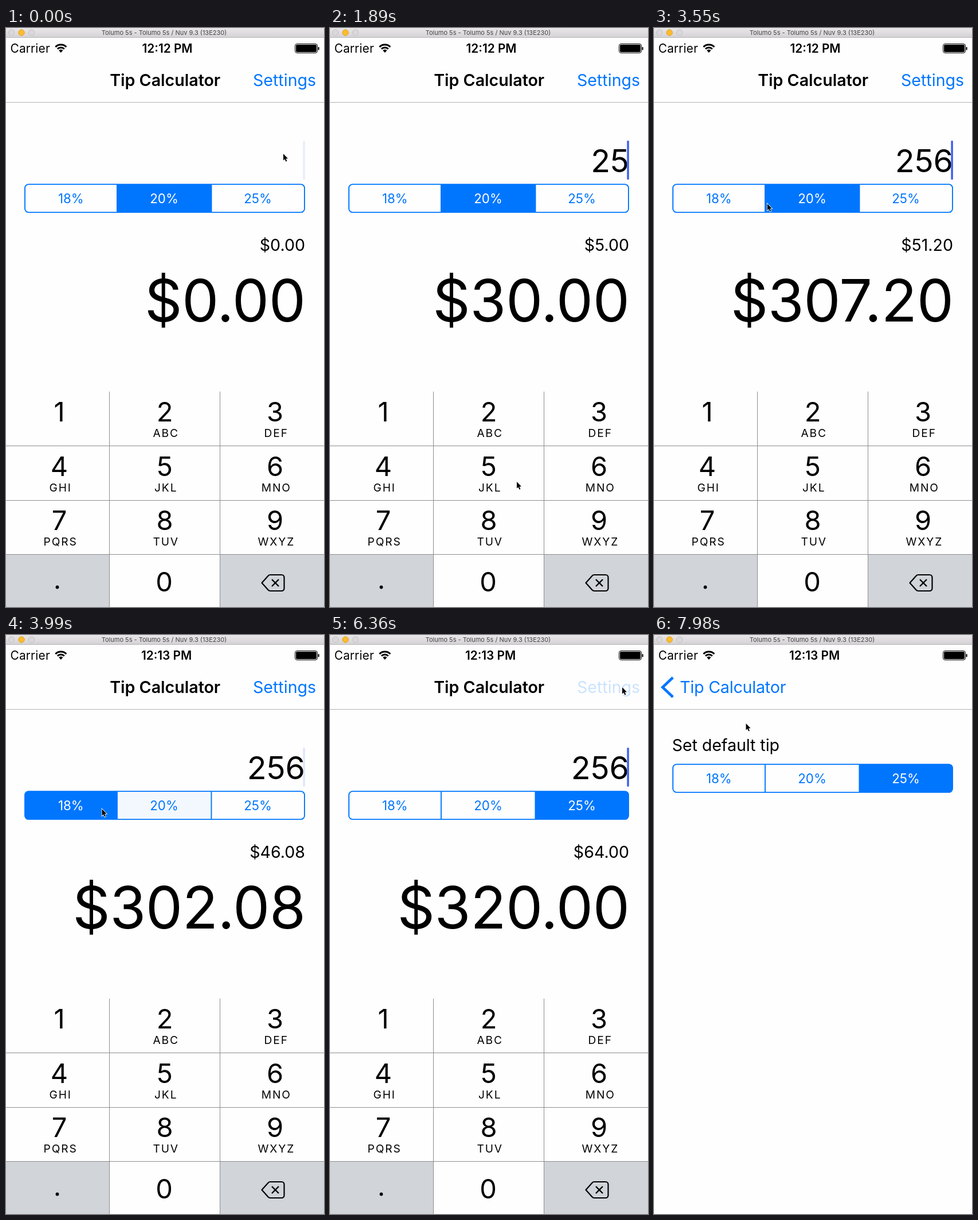
An HTML page with a canvas that plays this animation: 555x1008 px, repeating every 8000 ms.

```html
<!DOCTYPE html>
<html lang="en">
<head>
<meta charset="utf-8">
<title>Tip Calculator</title>
<style>
  html, body { margin: 0; width: 100%; height: 100%; overflow: hidden; background: #fefefe; }
  canvas { display: block; width: 555px; height: 1008px; }
</style>
</head>
<body>
<canvas id="stage" width="555" height="1008"></canvas>
<script>
const W = 555, H = 1008, LOOP = 8000;
const BLUE = '#0076ff', PAPER = '#fefefe', GREY = '#d1d4d9', LINE = '#8e8e90';
const SANS = 'Inter, "Open Sans", sans-serif';
const ctx = document.getElementById('stage').getContext('2d');

// what the user does
const TYPED = '256', TYPE_TIMES = [1270, 1710, 2240];
const RATES = [18, 20, 25];
const TIP = [[0, 1], [3900, 0], [5580, 2]];
const DEFAULT_TIP = [[0, 1], [7540, 2]];
const PUSH_START = 6660, PUSH_END = 7040;

// pointer moves: start, end, x, y
const MOVES = [
  [60, 530, 345, 802],
  [530, 830, 324, 697],
  [1200, 1420, 326, 790],
  [1890, 2410, 420, 803],
  [2500, 2680, 335.5, 807.5],
  [2680, 3370, 240, 310],
  [3440, 3640, 167.5, 303],
  [4180, 5050, 340, 299],
  [5240, 5370, 432, 293],
  [5640, 6270, 510, 91],
  [6680, 7190, 407, 266],
  [7500, 7660, 392, 350],
  [7660, 7980, 160.5, 154]
];

const clamp = v => Math.max(0, Math.min(1, v));
const ramp = (t, from, to) => clamp((t - from) / (to - from));
const smooth = k => k * k * (3 - 2 * k);
const money = v => '$' + v.toFixed(2);

function text(str, x, y, size, { align = 'left', weight = 400, color = '#000', gap = 0 } = {}) {
  ctx.font = `${weight} ${size}px ${SANS}`;
  ctx.letterSpacing = gap + 'px';
  ctx.textAlign = align;
  ctx.fillStyle = color;
  ctx.fillText(str, x, y);
}

function rect(x, y, w, h, color) {
  ctx.fillStyle = color;
  ctx.fillRect(x, y, w, h);
}

function stroke(width, color) {
  ctx.lineWidth = width;
  ctx.strokeStyle = color;
  ctx.stroke();
}

function fill(color) {
  ctx.fillStyle = color;
  ctx.fill();
}

function disc(x, y, r, color) {
  ctx.beginPath();
  ctx.arc(x, y, r, 0, 7);
  fill(color);
}

function box(x, y, w, h, r) {
  ctx.beginPath();
  ctx.roundRect(x, y, w, h, r);
}

function poly(points, closed) {
  ctx.beginPath();
  points.forEach(([x, y]) => ctx.lineTo(x, y));
  if (closed) ctx.closePath();
}

function layer(dx, alpha, draw) {
  if (alpha <= 0) return;
  ctx.save();
  ctx.translate(dx, 0);
  ctx.globalAlpha *= alpha;
  draw();
  ctx.restore();
}

function titleBar() {
  const g = ctx.createLinearGradient(0, 0, 0, 17);
  g.addColorStop(0, '#e9e7e9');
  g.addColorStop(1, '#d3d1d3');
  rect(0, 0, W, 17, g);
  rect(0, 16, W, 1, '#b6b4b6');
  ['#dad8da', '#fdbc2f', '#dad8da'].forEach((color, i) => {
    disc(9.5 + 17.5 * i, 8, 5.2, color);
    stroke(1, i === 1 ? '#dfa023' : '#c3c1c3');
  });
  text('Tolumo 5s - Tolumo 5s / Nuv 9.3 (13E230)', 276, 12, 11, { align: 'center', color: '#454545' });
}

function statusBar(t) {
  text('Carrier', 7.5, 43, 20.8, { gap: 0.2 });
  const late = t >= TIP[1][0];
  text(late ? '12:13 PM' : '12:12 PM', late ? 280 : 281.5, 43, 20.8, { align: 'center', weight: 600 });

  const from = -Math.PI * 0.75, to = -Math.PI * 0.25;
  for (const r of [8.4, 13.4]) {
    ctx.beginPath();
    ctx.arc(95.8, 42.5, r, from, to);
    stroke(3, '#000');
  }
  ctx.beginPath();
  ctx.moveTo(95.8, 43);
  ctx.arc(95.8, 42.5, 5, from, to);
  fill('#000');

  box(504.5, 27.5, 39, 16, 3.5);
  stroke(1, '#000');
  box(506, 29, 36, 13, 2);
  fill('#000');
  box(544.6, 33, 2, 5.5, 1);
  fill('#000');
}

function navBar(t, p) {
  const pressed = ramp(t, 6230, 6300) * (1 - ramp(t, 6640, 6700));
  layer(-150 * p, 1 - p, () =>
    text('Tip Calculator', 277.7, 101, 28.6, { align: 'center', weight: 600 }));
  layer(0, (1 - p) * (1 - 0.8 * pressed), () =>
    text('Settings', 431, 101, 28.6, { color: BLUE }));
  layer(0, p, () => {
    poly([[33, 74], [15, 91], [33, 108]]);
    stroke(4.6, BLUE);
  });
  layer(140 * (1 - p), p, () => text('Tip Calculator', 45, 101, 28.6, { color: BLUE, gap: -0.2 }));
  rect(0, 129, W, 1, '#b4b4b6');
}

function selected(states, t) {
  return states.filter(([time]) => time <= t).pop()[1];
}

function segments(y, states, t) {
  const edges = [33, 194, 358.5, 521];
  const active = selected(states, t);
  const [since] = states.find(([, i]) => i === active);
  const previous = since > 0 ? selected(states, since - 1) : -1;

  RATES.forEach((rate, i) => {
    const left = edges[i], width = edges[i + 1] - left;
    const alpha = i === active ? 1 : i === previous ? 1 - ramp(t, since, since + 95) : 0;
    layer(0, alpha, () => {
      box(left, y + 1, width, 48.8, [i ? 0 : 6, i < 2 ? 0 : 6, i < 2 ? 0 : 6, i ? 0 : 6]);
      fill(BLUE);
    });
    text(rate + '%', left + width / 2 - 0.2, y + 33.6, 22.3, {
      align: 'center', color: alpha > 0.5 ? '#fff' : BLUE
    });
    if (i) rect(left - 1, y + 1, 1.9, 48.8, BLUE);
  });
  box(33, y + 1, 488, 48.8, 6.5);
  stroke(1.9, BLUE);
}

// solid while typing, otherwise blinking with soft edges
function caretAlpha(t) {
  if (t >= 1150 && t < 1890) return 1;
  const p = (t - (t < 1150 ? -635 : 1440)) % 960;
  return ramp(p, 0, 120) * (1 - ramp(p, 530, 650));
}

function calculator(t) {
  const bill = TYPED.slice(0, TYPE_TIMES.filter(time => time <= t).length);
  const tip = bill * RATES[selected(TIP, t)] / 100;
  const right = { align: 'right' };
  text(bill, 522, 251, 55.5, right);
  layer(0, caretAlpha(t), () => {
    box(518.3, 196, 3.6, 68, 1.5);
    fill('#4264ee');
  });
  segments(271.1, TIP, t);
  text(money(tip), 522, 388, 28.6, right);
  text(money(bill * 1 + tip), 522.6, 510.5, 102, { align: 'right', gap: -0.4 });
}

function settings(t) {
  rect(0, 130, W, H - 130, PAPER);
  text('Set default tip', 31.5, 202, 28.6, { gap: -0.05 });
  segments(224.1, DEFAULT_TIP, t);
}

function backspace() {
  ctx.save();
  ctx.translate(470, 966);
  ctx.lineJoin = 'round';
  ctx.beginPath();
  ctx.moveTo(-23.5, 0);
  ctx.arcTo(-11, -14, 0, -14, 5);
  ctx.arcTo(15.5, -14, 15.5, 0, 4.5);
  ctx.arcTo(15.5, 14, 0, 14, 4.5);
  ctx.arcTo(-11, 14, -23.5, 0, 5);
  ctx.closePath();
  stroke(2.2, '#000');
  for (const d of [-6, 6]) {
    poly([[-d, -6], [d, 6]]);
    stroke(2.4, '#000');
  }
  ctx.restore();
}

function keyboard(t) {
  const top = 633, row = 94.5;
  rect(0, top, W, H - top, PAPER);
  if (t >= 1180 && t < 1340) rect(181, top, 192, 94, GREY);
  if (t >= 1430 && t < 1890) rect(181, 728, 192, 94, GREY);
  rect(0, 917, 180, 91, GREY);
  rect(374, 917, 181, 91, GREY);
  for (let i = 1; i < 4; i++) rect(0, Math.round(top - 0.2 + row * i), W, 1, LINE);
  for (const x of [180, 373]) rect(x, top, 1, H - top, LINE);

  const center = { align: 'center' };
  ['', 'ABC', 'DEF', 'GHI', 'JKL', 'MNO', 'PQRS', 'TUV', 'WXYZ'].forEach((letters, i) => {
    const x = 93 + 188.3 * (i % 3) - (i % 3 === 1 ? 4.3 : 0);
    const y = 685 + Math.floor(i / 3) * row;
    text(i + 1, x, y, 47, center);
    text(letters, x + 2.2, y + 27, 19.2, { align: 'center', gap: 1.9 });
  });
  text('0', 276, 981, 47, center);
  disc(89.5, 973.5, 2.9, '#000');
  backspace();
}

function pointer(t) {
  let x = 484, y = 219;
  for (const [start, end, toX, toY] of MOVES) {
    const k = smooth(ramp(t, start, end));
    x += (toX - x) * k;
    y += (toY - y) * k;
  }
  ctx.save();
  ctx.translate(x, y);
  poly([[0, 0], [0, 11.6], [2.6, 9.2], [4.5, 13.6], [6.4, 12.8], [4.5, 8.5], [8, 8.3]], true);
  stroke(1.6, '#fff');
  fill('#000');
  ctx.restore();
}

function draw(t) {
  const p = 1 - (1 - ramp(t, PUSH_START, PUSH_END)) ** 3;
  rect(0, 0, W, H, PAPER);
  if (p < 1) {
    layer(-W * 0.3 * p, 1, () => calculator(t));
    rect(0, 130, W, H - 130, `rgba(0,0,0,${0.1 * p})`);
    layer(-W * p, 1, () => keyboard(t));
  }
  if (p > 0) layer(W * (1 - p), 1, () => settings(t));
  rect(0, 17, W, 112, PAPER);
  navBar(t, p);
  statusBar(t);
  titleBar();
  pointer(t);
}

function tick() {
  draw(performance.now() % LOOP);
  requestAnimationFrame(tick);
}
tick();
</script>
</body>
</html>
```
